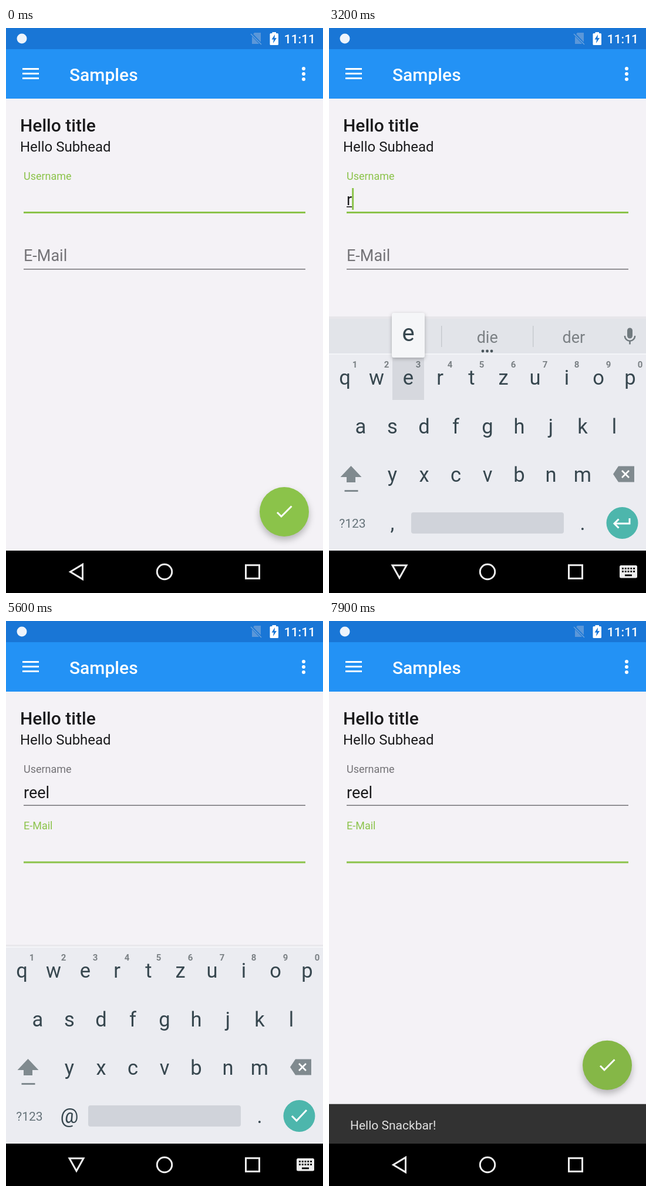
These frames come from a looping animation (540 px wide and 960 px high, 8000 ms). An HTML page with a canvas:

```html
<!DOCTYPE html>
<html>
<head>
<meta charset="utf-8">
<style>
html, body { margin: 0; width: 540px; height: 960px; overflow: hidden; background: #000; }
canvas { display: block; }
</style>
</head>
<body>
<canvas id="stage" width="540" height="960"></canvas>
<script>
const c = document.getElementById('stage').getContext('2d');
const LOOP = 8000, STEP = 100;
const GREEN = '#8bc34a', BG = '#f4f2f6', INK = '#1b1b1d', GREY = '#747377', KEY = '#37474f', ICON = '#808a8f', NAV = '#eee';

const WORD = 'reel';
const PRESSES = [2800, 3200, 3600, 4100];
const SUGGESTIONS = [['', 'Rest', ''], ['er', 'die', 'der'], ['es', 'er', 'Team'], ['res', 'des', 'Team'], ['Rest', WORD, 'Reel']];
const FOCUS = 5200;

// Key centres and baselines
const keys = {};
[['qwertzuiop', 27, 606], ['asdfghjkl', 54, 689], ['yxcvbnm', 108, 771]].forEach(([row, x, y]) =>
  [...row].forEach((k, i) => keys[k] = { x: x + i * 54, y }));

const clamp = v => Math.max(0, Math.min(1, v));
const mix = (a, b, u) => a + (b - a) * u;
const smooth = u => u * u * (3 - 2 * u);
const within = (t, ...ranges) => ranges.some(([a, b]) => t >= a && t < b);

function rect(x, y, w, h, color, r = 0) {
  c.fillStyle = color;
  c.beginPath();
  c.roundRect(x, y, w, h, r);
  c.fill();
}
function disc(x, y, r, color) {
  c.fillStyle = color;
  c.beginPath();
  c.arc(x, y, r, 0, 7);
  c.fill();
}
function path(points, { fill, stroke, width = 3, close = false }) {
  c.beginPath();
  for (let i = 0; i < points.length; i += 2) c.lineTo(points[i], points[i + 1]);
  if (close || fill) c.closePath();
  if (fill) { c.fillStyle = fill; c.fill(); }
  if (stroke) { c.strokeStyle = stroke; c.lineWidth = width; c.stroke(); }
}
function text(s, x, y, size, color, weight = 400, align = 'left') {
  c.font = `${weight} ${size}px Roboto, sans-serif`;
  c.textAlign = align;
  c.fillStyle = color;
  c.fillText(s, x, y);
}

function header() {
  rect(0, 0, 540, 36, '#1976d6');
  rect(0, 36, 540, 84, '#2392f5');
  disc(27, 18, 8.5, '#eef4fb');
  path([423, 8, 434, 8, 434, 27, 419, 27, 419, 13], { fill: '#5b97d9' });
  path([417, 9, 435, 28], { stroke: '#1976d6', width: 4 });
  path([417, 10, 435, 28], { stroke: '#6da3dd', width: 1.5 });
  rect(449.5, 9, 14.5, 20, '#fff', 1.5);
  rect(453.5, 7, 6.5, 3, '#fff');
  path([458, 11, 452.5, 19.5, 456, 19.5, 455, 26, 461, 17, 457.5, 17], { fill: '#1976d6' });
  text('11:11', 527, 26, 21, '#fff', 500, 'right');
  for (const y of [68, 76, 84]) rect(28, y, 28, 3, '#fff');
  for (const y of [69, 78, 87]) disc(507, y, 3, '#fff');
  text('Samples', 108, 89.5, 30, '#fff', 500);
}

function fieldLine(y, active) {
  if (active) rect(30, y - 1, 480, 3, GREEN);
  else rect(30, y - 0.5, 480, 1.4, GREY);
}

function form(t) {
  text('Hello title', 24, 176, 30, INK, 500);
  text('Hello Subhead', 24, 210, 24, INK);

  const onEmail = t >= FOCUS;
  text('Username', 30, 258, 18, onEmail ? GREY : GREEN);
  const typed = WORD.slice(0, PRESSES.filter(p => t >= p + 100).length);
  text(typed, 30, 301, 27, INK);
  const width = c.measureText(typed).width;
  if (!onEmail && typed) rect(30, 303, width, 1.6, INK);
  fieldLine(313, !onEmail);
  if (within(t, [500, 900], [1500, 2000], [2400, 4800])) rect(30 + width, 272, 3, 37, GREEN);

  const up = smooth(clamp((t - FOCUS) / 200));
  text('E-Mail', 30, mix(396, 354, up), mix(27, 18, up), onEmail ? GREEN : GREY);
  fieldLine(409.5, onEmail);
  if (within(t, [5300, 5600], [6200, 6700], [7200, 7600])) rect(30, 369, 3, 37, GREEN);
}

function fab(t, lift) {
  c.save();
  c.shadowColor = 'rgba(0,0,0,.26)';
  c.shadowBlur = 12;
  c.shadowOffsetY = 6;
  disc(474, 822 - lift, 42, t >= 7600 ? '#85b747' : GREEN);
  c.restore();
  path([462, 823 - lift, 469, 830 - lift, 486.5, 812.5 - lift], { stroke: '#fff' });
}

function suggestionBar(t) {
  rect(0, 490, 540, 4, '#e7e6ea');
  rect(0, 494, 540, 59, '#e2e4e9');
  const stage = PRESSES.filter(p => t >= p + 200).length;
  SUGGESTIONS[stage].forEach((s, i) => text(s, 122.5 + i * 147.2, 535, 27, '#7b8084', 400, 'center'));
  if (stage) {
    for (const x of [191, 347]) rect(x, 506, 1.4, 36, '#c6c9cd');
    for (const x of [262, 269.5, 277]) disc(x, 549, 2.4, '#4a555b');
  }
  const mic = '#717a7f';
  rect(508, 509.5, 9, 18, mic, 4.5);
  c.beginPath();
  c.arc(512.5, 523, 8.7, 0, Math.PI);
  c.strokeStyle = mic;
  c.lineWidth = 2.5;
  c.stroke();
  rect(511.2, 531, 2.6, 6.5, mic);
}

function keyPopup(t) {
  const i = PRESSES.findIndex(p => within(t, [p, p + 200]));
  if (i < 0) return;
  const { x, y } = keys[WORD[i]];
  rect(x - 27, y - 50, 54, 76, 'rgba(60,75,85,.12)');
  c.save();
  c.shadowColor = 'rgba(0,0,0,.25)';
  c.shadowBlur = 6;
  c.shadowOffsetY = 2;
  rect(x - 28, y - 122, 56, 76, '#f5f6f8', 3);
  c.restore();
  text(WORD[i], x, y - 74, 40, KEY, 400, 'center');
}

function keyboard(t, away) {
  const shift = 52 * away * away, alpha = 1 - away ** 1.75;
  const email = t >= FOCUS + 100;
  c.save();
  c.beginPath();
  c.rect(0, 0, 540, 888 + shift);
  c.clip();
  c.globalAlpha = alpha;
  c.translate(0, shift);
  if (email) rect(0, 550, 540, 4, '#e9e8ec');
  else suggestionBar(t);
  rect(0, 553, 540, 335, '#ebecf1');
  rect(0, 553, 540, 2, '#f4f5f8');

  for (const k in keys) text(k, keys[k].x, keys[k].y, 34.5, KEY, 400, 'center');
  [...'1234567890'].forEach((n, i) => text(n, 44 + i * 54, 576.5, 15, '#7b8185', 700, 'center'));

  path([37.5, 744, 55.5, 763, 45, 763, 45, 772, 30, 772, 30, 763, 19.5, 763], { fill: ICON });
  rect(26.5, 785, 23, 3, ICON);
  path([484, 758, 493, 744.5, 520, 744.5, 520, 771.5, 493, 771.5], { fill: ICON });
  path([499, 752, 511, 764], { stroke: '#fff', width: 2.6 });
  path([511, 752, 499, 764], { stroke: '#fff', width: 2.6 });

  text('?123', 40, 849, 21, '#66737a', 400, 'center');
  text(email ? '@' : ',', 108, 853, 34.5, KEY, 400, 'center');
  text('.', 432, 853, 34.5, KEY, 400, 'center');
  rect(140, 823, 260, 36, '#d0d3da', 4);
  disc(499.5, 841, 27, within(t, [5100, 5300]) ? '#459f97' : '#4db6ac');
  if (email) path([487, 841, 495, 849, 512, 831], { stroke: '#fff' });
  else {
    path([512, 833, 512, 842, 487, 842], { stroke: '#fff' });
    path([493.5, 834.5, 486, 842, 493.5, 849.5], { stroke: '#fff' });
  }
  keyPopup(t);
  c.restore();
  return { shift, alpha };
}

function navBar(t, top, typing) {
  rect(0, 888 + top.shift, 540, 72, '#000');
  if (top.shift > 0) {
    const v = Math.round(244 - 120 * top.alpha);
    rect(0, 888, 540, top.shift, `rgb(${v},${v},${v})`);
  }
  if (within(t, [6200, 6700])) {
    const glow = t < 6400 ? mix(0.06, 0.1, (t - 6200) / 200) : 0.1 * (1 - (t - 6400) / 300);
    rect(40, 888, 161, 74, `rgba(255,255,255,${glow})`, 36);
  }
  path(typing ? [108, 913, 132, 913, 120, 934.5] : [109.5, 924, 130.5, 911.5, 130.5, 936.5],
    { stroke: NAV, close: true });
  c.strokeStyle = NAV;
  c.beginPath();
  c.arc(270, 924, 12.7, 0, 7);
  c.stroke();
  c.strokeRect(408.5, 912.7, 23, 22.6);
  if (!typing) return;
  rect(495, 913, 30, 21.5, NAV, 2.5);
  for (const y of [917, 922])
    for (let x = 499; x < 521; x += 4.8) rect(x, y, 2.8, 2.8, '#000');
  rect(504, 928.5, 12, 2.8, '#000');
}

function snackbar(t, height) {
  if (!height) return;
  const y = 888 - height;
  rect(0, y, 540, height, '#323232');
  c.save();
  c.beginPath();
  c.rect(0, y, 540, height);
  c.clip();
  text('Hello Snackbar!', 36, y + 43, 21, `rgba(255,255,255,${0.85 * clamp((t - 7780) / 120)})`);
  c.restore();
}

function draw(now) {
  const t = Math.floor(now % LOOP / STEP) * STEP;
  const lift = 72 * smooth(clamp((t - 7750) / 178));
  const away = t < 4000 ? 1 - clamp((t - 1650) / 300) : clamp((t - 6250) / 300);
  rect(0, 0, 540, 960, BG);
  header();
  form(t);
  fab(t, lift);
  snackbar(t, lift);
  const top = away < 1 ? keyboard(t, away) : { shift: 0, alpha: 0 };
  navBar(t, top, within(t, [1700, 6300]));
}

const start = performance.now();
(function tick() {
  draw(performance.now() - start);
  requestAnimationFrame(tick);
})();
</script>
</body>
</html>
```
